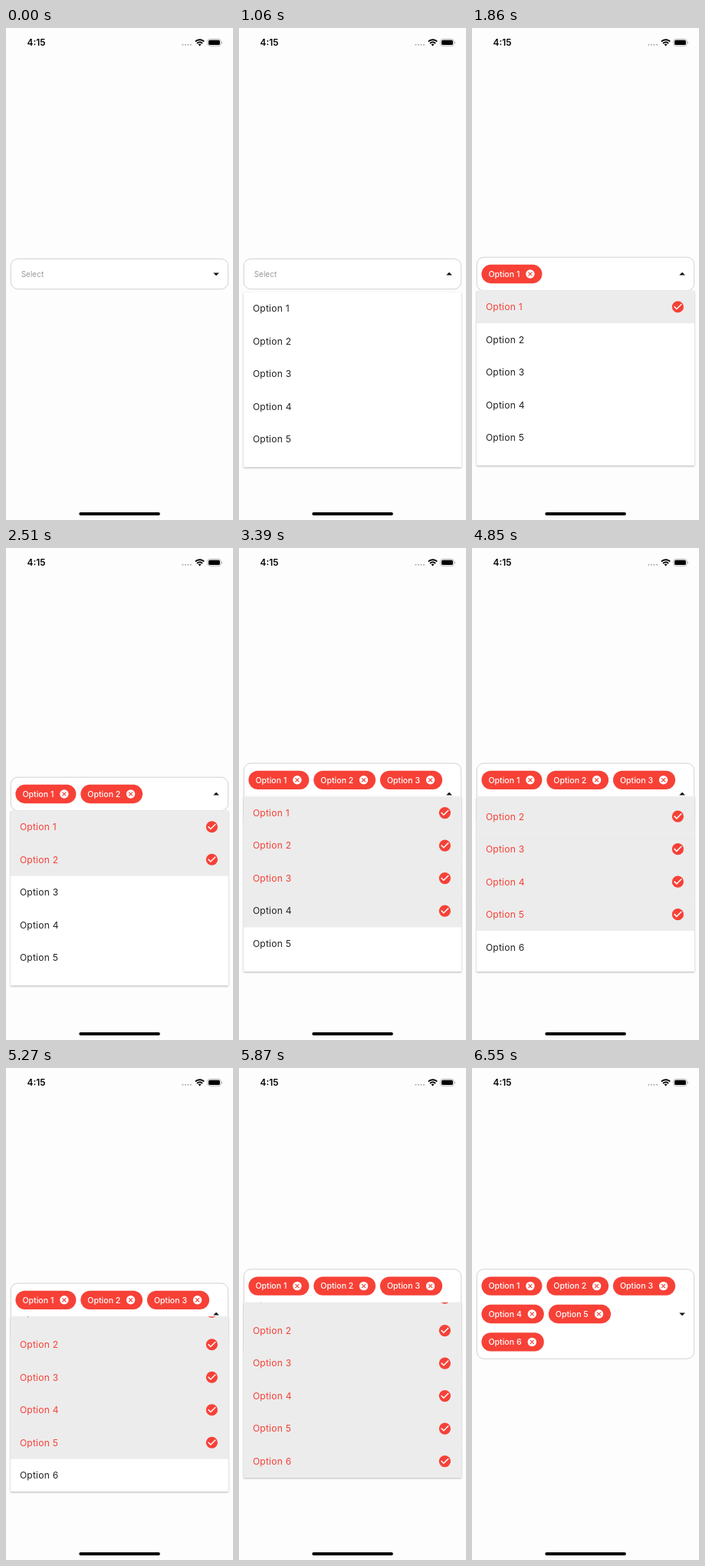
An HTML page for the animation above (8 s loop, 296 px wide and 640 px high).

```html
<!DOCTYPE html>
<html lang="en">
<head>
<meta charset="utf-8">
<title>Multi-select dropdown</title>
<style>
  html, body { margin: 0; width: 100%; height: 100%; overflow: hidden; background: #fdfdfd; }
  svg { display: block; width: 100%; height: 100%; }
  text { font-family: Inter, Roboto, sans-serif; white-space: pre; }
  .clock { font-size: 11.8px; font-weight: 600; }
  .hint { font-size: 10px; fill: #9b9b9b; }
  .chip { font-size: 10.6px; font-weight: 500; fill: #fff; }
  .option { font-size: 12.1px; letter-spacing: .2px; }
  .menu { filter: drop-shadow(0 1.4px 1.3px rgba(0, 0, 0, .3)); }
</style>
</head>
<body>
<svg viewBox="0 0 296 640">
  <defs>
    <clipPath id="menuClip"><rect id="clipRect" x="6" width="284" height="227.7"/></clipPath>
    <g id="check">
      <circle r="10" fill="#f74137"/>
      <path d="M-6.3-.7L-2 3.6L6.3-4.7" fill="none" stroke="#fff" stroke-width="2"/>
    </g>
    <g id="cancel">
      <circle r="10" fill="#fff"/>
      <path d="M-4.3-4.3L4.3 4.3M4.3-4.3L-4.3 4.3" stroke="#f74137" stroke-width="2"/>
    </g>
  </defs>

  <text class="clock" x="27.6" y="23.1">4:15</text>
  <g fill="#b5b5b5">
    <circle cx="230.5" cy="21.8" r="1.1"/><circle cx="234" cy="21.8" r="1.1"/>
    <circle cx="237.5" cy="21.8" r="1.1"/><circle cx="241" cy="21.8" r="1.1"/>
  </g>
  <g fill="none" stroke="#000" stroke-width="1.9">
    <path d="M246.9 17.6a8.1 8.1 0 0 1 11.4 0"/>
    <path d="M249.1 20a5 5 0 0 1 7 0"/>
  </g>
  <path d="M252.6 23.4l-1.9-2a2.8 2.8 0 0 1 3.8 0z"/>
  <rect x="262.8" y="14.5" width="17.4" height="8.8" rx="2.7" fill="none" stroke="#a8a8a8" stroke-width=".8"/>
  <rect x="264.1" y="15.8" width="14.8" height="6.2" rx="1.6"/>
  <path d="M281 17.4a1.7 1.7 0 0 1 0 3z" fill="#a8a8a8"/>
  <rect x="95.3" y="630" width="105.6" height="3.9" rx="1.95"/>

  <g id="field"></g>
  <g id="menu"></g>
</svg>

<script>
const LOOP = 8000, OPEN = 950, CLOSE = 6330;
const RED = '#f74137', DARK = '#222';
const CENTER = 320, ROW = 36.4, ITEM = 42.5, MENU_H = 227.7, MAX_SCROLL = 6 * ITEM - MENU_H;

// at: moment of the tap, fade: duration of the label's colour change
const options = [
  { at: 1650, fade: 200, x: 12.4, row: 0, width: 79 },
  { at: 2290, fade: 200, x: 97.3, row: 0, width: 80.8 },
  { at: 2940, fade: 200, x: 183.9, row: 0, width: 81.2 },
  { at: 3390, fade: 105, x: 12.4, row: 1, width: 81.4 },
  { at: 3910, fade: 105, x: 99.8, row: 1, width: 81.2 },
  { at: 5650, fade: 200, x: 12.4, row: 2, width: 81.4 },
];

const $ = id => document.getElementById(id);
const clamp = v => Math.max(0, Math.min(1, v));

// Drag past the end of the list, then spring back to its limit.
function scrollAt(t) {
  const peak = 38;
  if (t < 4850) return peak * (1 - Math.cos(Math.PI * clamp((t - 4400) / 450))) / 2;
  if (t >= 5270) return MAX_SCROLL;
  return MAX_SCROLL + (peak - MAX_SCROLL) * Math.exp(-(t - 4850) / 125);
}

function chip(option, index, top) {
  const y = top + 3.6 + ROW * (option.row + .5);
  const { x, width } = option;
  return `<rect x="${x}" y="${y - 12.15}" width="${width}" height="24.3" rx="12.15" fill="${RED}"/>
    <text class="chip" x="${x + 9}" y="${y + 3.7}">Option ${index + 1}</text>
    <use href="#cancel" transform="translate(${x + width - 15.5} ${y}) scale(.57)"/>`;
}

function fieldMarkup(t, top, height, chosen) {
  const turn = 180 * (clamp((t - OPEN) / 105) - clamp((t - CLOSE) / 215));
  const content = chosen.length
    ? chosen.map((option, i) => chip(option, i, top)).join('')
    : '<text class="hint" x="19.7" y="323.5">Select</text>';
  return `<rect x="6.3" y="${top}" width="283.4" height="${height}" rx="9.1"
      fill="#fff" stroke="#c6c6c6" stroke-width=".8"/>${content}
    <path d="M-3.8-1.5h7.6L0 2.3z" fill="#111" transform="translate(274.1 ${CENTER}) rotate(${turn})"/>`;
}

function menuItem(option, index, t, listTop) {
  const y = listTop + index * ITEM, middle = y + ITEM / 2;
  const selected = t >= option.at;
  const redness = 100 * clamp((t - option.at) / option.fade);
  return `${selected ? `<rect x="6" y="${y}" width="284" height="${ITEM + .1}" fill="#ececec"/>` : ''}
    <text class="option" x="17.9" y="${middle + 4.4}"
      style="fill:color-mix(in srgb, ${RED} ${redness}%, ${DARK})">Option ${index + 1}</text>
    ${selected ? `<use href="#check" transform="translate(268.4 ${middle}) scale(.759)"/>` : ''}`;
}

function menuMarkup(t, menuTop) {
  const listTop = menuTop - scrollAt(t);
  return `<rect class="menu" x="6" y="${menuTop}" width="284" height="${MENU_H}" fill="#fff"/>
    <g clip-path="url(#menuClip)">
      ${options.map((option, i) => menuItem(option, i, t, listTop)).join('')}
    </g>`;
}

function render(t) {
  const chosen = options.filter(option => t >= option.at);
  const rows = chosen.length ? chosen.at(-1).row + 1 : 0;
  const height = rows ? 7.2 + ROW * rows : 39.4;
  const top = CENTER - height / 2;
  const menuTop = top + 43.3;
  $('clipRect').setAttribute('y', menuTop);
  $('field').innerHTML = fieldMarkup(t, top, height, chosen);
  $('menu').innerHTML = t >= OPEN && t < CLOSE ? menuMarkup(t, menuTop) : '';
}

const start = performance.now();
function tick() {
  render((performance.now() - start) % LOOP);
  requestAnimationFrame(tick);
}
tick();
</script>
</body>
</html>
```
